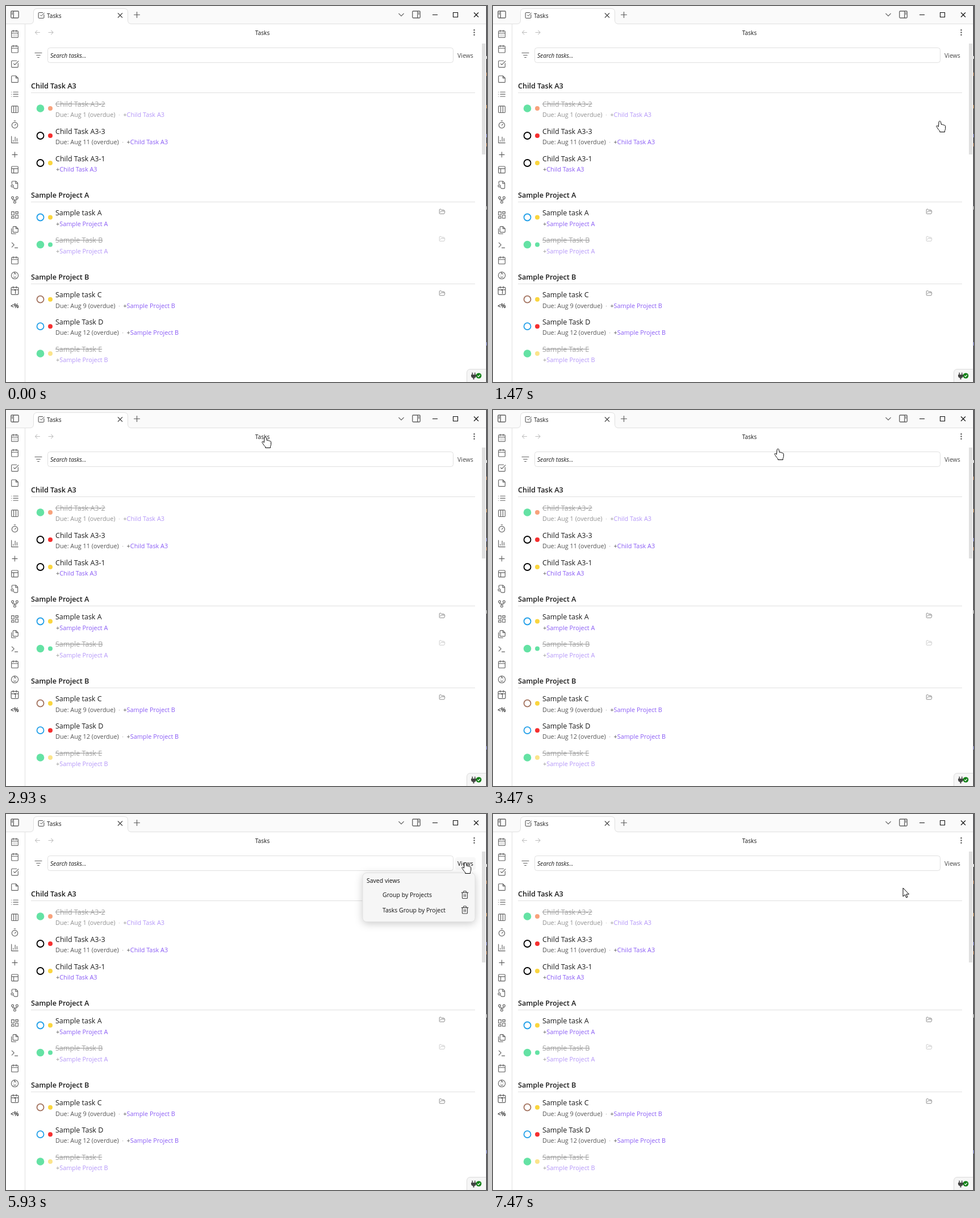
These frames come from a looping animation (847x661 px, 8 s). An HTML page:

```html
<!DOCTYPE html>
<html lang="en">
<head>
<meta charset="utf-8">
<title>Tasks</title>
<style>
html, body { margin: 0; width: 100%; height: 100%; overflow: hidden; background: #fff; }
svg { display: block; font-family: "Open Sans", "Noto Sans", sans-serif; fill: #1a1a1a; }
.icon { fill: none; stroke-width: 1.75; stroke-linecap: round; stroke-linejoin: round; }
.line { fill: none; stroke: #e0e0e0; }
.ui { font-size: 10.2px; }
.heading { font-size: 12.6px; font-weight: 600; }
.title { font-size: 12.5px; }
.meta { font-size: 10.85px; fill: #555; }
.link { fill: #8a5cf5; }
.done { opacity: .64; }
.done .title { fill: #707070; text-decoration: line-through; }
.menu { font-size: 10.5px; fill: #111; }
.pointer { fill: #fff; stroke: #000; stroke-linejoin: round; }
</style>
</head>
<body>
<svg id="stage" width="847" height="661" viewBox="0 0 847 661"></svg>
<script>
// Icon outlines on a 24 unit grid
const calendar = 'M5 4h14a2 2 0 0 1 2 2v14a2 2 0 0 1-2 2H5a2 2 0 0 1-2-2V6a2 2 0 0 1 2-2zM8 2v4M16 2v4M3 10h18';
const square = 'M5 3h14a2 2 0 0 1 2 2v14a2 2 0 0 1-2 2H5a2 2 0 0 1-2-2V5a2 2 0 0 1 2-2z';
const checkbox = 'M21 10v9a2 2 0 0 1-2 2H5a2 2 0 0 1-2-2V5a2 2 0 0 1 2-2h12M9 11l3 3L22 4';
const panel = 'M5 4h14a2 2 0 0 1 2 2v12a2 2 0 0 1-2 2H5a2 2 0 0 1-2-2V6a2 2 0 0 1 2-2z';
const plus = 'M5 12h14M12 5v14';
const cross = 'M6 6l12 12M18 6L6 18';
const arrowLeft = 'M19 12H5M11 6l-6 6 6 6';
const arrowRight = 'M5 12h14M13 6l6 6-6 6';
const folder = 'M6 14l1.5-3A2 2 0 0 1 9.2 10H20a2 2 0 0 1 2 2.5l-1.6 6A2 2 0 0 1 18.5 20H4a2 2 0 0 1-2-2V5a2 2 0 0 1 2-2h4l2.5 3H18a2 2 0 0 1 2 2v2';
const trash = 'M3 6h18M19 6v14a2 2 0 0 1-2 2H7a2 2 0 0 1-2-2V6M8 6V4a2 2 0 0 1 2-2h4a2 2 0 0 1 2 2v2M10 11v6M14 11v6';
const ribbon = [
  calendar + 'M8 14h.01M12 14h.01M16 14h.01M8 18h.01M12 18h.01M16 18h.01',
  calendar,
  checkbox,
  'M15 3H5a2 2 0 0 0-2 2v14a2 2 0 0 0 2 2h14a2 2 0 0 0 2-2V9zM15 3v6h6',
  'M8 6h13M8 12h13M8 18h13M3 6h.01M3 12h.01M3 18h.01',
  square + 'M9 3v18M15 3v18',
  'M10 2h4M12 14l3-3M4 14a8 8 0 1 0 16 0a8 8 0 1 0-16 0',
  'M3 3v18h18M8 17v-3M13 17V5M18 17V9',
  plus,
  square + 'M3 9h18M9 9v12',
  'M4 9V4a2 2 0 0 1 2-2h9l5 5v13a2 2 0 0 1-2 2h-7M14 2v6h6M2 15a3 3 0 1 0 6 0a3 3 0 1 0-6 0M8 18l2 3',
  'M9 18a3 3 0 1 0 6 0a3 3 0 1 0-6 0M3 6a3 3 0 1 0 6 0a3 3 0 1 0-6 0M15 6a3 3 0 1 0 6 0a3 3 0 1 0-6 0M18 9v1a2 2 0 0 1-2 2H8a2 2 0 0 1-2-2V9M12 12v3',
  'M3 3h7v9H3zM14 3h7v5h-7zM14 12h7v9h-7zM3 16h7v5H3z',
  'M15 2H9a2 2 0 0 0-2 2v12a2 2 0 0 0 2 2h10a2 2 0 0 0 2-2V8zM15 2v6h6M3 8v12a2 2 0 0 0 2 2h10',
  'M4 17l6-6-6-6M12 19h8',
  calendar,
  'M2.5 12a9.5 9.5 0 1 0 19 0a9.5 9.5 0 1 0-19 0M8 11h.01M16 11h.01M9 16q3 2 6 0M12 3q-3 3 0 5q3 0 2-2'
];

const icon = (path, x, y, size = 16, color = '#606060') =>
  `<path class="icon" stroke="${color}" d="${path}" transform="translate(${x - size / 2} ${y - size / 2}) scale(${size / 24})"/>`;
const text = (x, y, content, cls, extra = '') => `<text x="${x}" y="${y}" class="${cls}" ${extra}>${content}</text>`;
const rect = (x, y, w, h, fill, extra = '') => `<rect x="${x}" y="${y}" width="${w}" height="${h}" fill="${fill}" ${extra}/>`;
const dot = (x, y, r, fill) => `<circle cx="${x}" cy="${y}" r="${r}" fill="${fill}"/>`;

const green = '#64e2a4', yellow = '#fad53e', red = '#f63030', blue = '#219fe8';
const headings = [[145, 'Child Task A3'], [337, 'Sample Project A'], [480.5, 'Sample Project B']];
// centre y, ring, priority, title, due date, parent; no ring means done
const tasks = [
  [180, '', '#f8a27c', 'Child Task A3-2', 'Aug 1', 0],
  [228, '#000', red, 'Child Task A3-3', 'Aug 11', 0],
  [276, '#000', yellow, 'Child Task A3-1', '', 0],
  [371.5, blue, yellow, 'Sample task A', '', 1],
  [419.5, '', green, 'Sample Task B', '', 1],
  [515.7, '#a1705c', yellow, 'Sample task C', 'Aug 9', 2],
  [563.2, blue, red, 'Sample Task D', 'Aug 12', 2],
  [611, '', '#fbe48b', 'Sample Task E', '', 2]
];

function taskRow([y, ring, priority, title, due, parent]) {
  const dueText = due ? `Due: ${due} (overdue)<tspan dx="5.5" fill="#ababab">·</tspan><tspan dx="5.5">+</tspan>` : '+';
  const circle = ring
    ? `<circle cx="60.5" cy="${y}" r="6" fill="none" stroke="${ring}" stroke-width="1.8"/>`
    : dot(60.5, y, 6.8, green);
  return circle + dot(78, y, 4, priority) +
    `<g class="${ring ? '' : 'done'}">` +
    text(87, y - 3.4, title, 'title') +
    text(due ? 87 : 88, y + 15, `${dueText}<tspan class="link">${headings[parent][1]}</tspan>`, 'meta') + '</g>';
}

const tabOutline = 'M0 31.5H42Q48.5 31.5 48.5 25V11Q48.5 4.5 55 4.5H208Q214.5 4.5 214.5 11V25Q214.5 31.5 221 31.5H846';
const windowBar = () =>
  rect(0, 0, 846, 31, '#fafafa') +
  `<path d="${tabOutline}V34H0z" fill="#fff"/>` +
  `<path class="line" d="${tabOutline}M33.5 32V661"/>` +
  icon(panel + 'M9 4v16M5.5 8h1M5.5 11h1', 15.5, 15, 18) +
  icon(checkbox, 62, 16.5, 13, '#333') + text(72, 20.5, 'Tasks', 'ui') +
  icon(cross, 201, 16.5, 15, '#444') + icon(plus, 230.5, 15.5, 17) +
  icon('M6 9l6 6 6-6', 696, 15.5, 17) + icon(panel + 'M15 4v16M17.5 8h1M17.5 11h1', 722.5, 15, 18) +
  '<path d="M751 15.5h9M787.5 11.5h8v8h-8zM824 11.5l8 8M832 11.5l-8 8" fill="none" stroke="#111" stroke-width="1.1"/>';

const toolbar = () =>
  icon(arrowLeft, 55.5, 46.5, 14, '#bdbdbd') + icon(arrowRight, 79, 46.5, 14, '#bdbdbd') +
  text(451.5, 50.5, 'Tasks', 'ui', 'text-anchor="middle"') +
  [42.3, 46.5, 50.7].map(y => dot(824.5, y, 1.2, '#555')).join('') +
  icon('M3 6h18M7 12h10M10 18h4', 57, 86.5, 16) +
  rect(73.5, 73.5, 714, 26, '#fff', 'rx="4" stroke="#e0e0e0"') +
  text(78, 90.5, 'Search tasks...', 'ui', 'font-style="italic"') +
  rect(791, 76, 36, 22, '#f7f7f7', 'id="pressed" rx="4"') +
  text(795, 90.5, 'Views', 'menu', 'id="views"') +
  rect(838, 66, 6, 195, '#e0e0e0');

const statusBar = () =>
  '<path d="M811.5 662V645Q811.5 638.5 818 638.5H846V662z" fill="#f6f6f6" stroke="#dcdcdc"/>' +
  '<path d="M819 648h9v2q0 3.5-3.5 4v2.5h-2V654q-3.5-.5-3.5-4zM820.5 644.500h1.500v4h-1.500zM825 644.500h1.500v4H825z" fill="#444"/>' +
  dot(832.5, 650, 4.8, '#128017') + '<path d="M830.2 650l1.800 1.800 2.800-3.300" fill="none" stroke="#fff" stroke-width="1.2"/>';

const screenEdge = () => rect(845, 0, 1, 661, '#b8b8b8') + rect(846, 0, 1, 661, '#1f1f23') +
  rect(846, 88, 1, 5, '#fff') +
  [[117, '#a86b3c'], [174, '#c08040'], [225, '#6a70c8'], [241, '#a86b3c'], [352, '#aaa'], [591, '#6a70c8']]
    .map(([y, color]) => rect(846, y, 1, 6, color)).join('');

const savedViews = () =>
  '<g id="menu">' +
  rect(628, 103.5, 198, 86, '#f6f6f6', 'rx="7" stroke="#e0e0e0" style="filter:drop-shadow(0 3px 7px #0003)"') +
  text(635, 121, 'Saved views', 'menu') +
  text(663, 146, 'Group by Projects', 'menu') + icon(trash, 808, 142, 15.5, '#444') +
  text(663, 172.5, 'Tasks Group by Project', 'menu') + icon(trash, 808, 168.5, 15.5, '#444') + '</g>';

const stage = document.getElementById('stage');
stage.innerHTML = rect(0, 0, 847, 661, '#fff') + windowBar() +
  ribbon.map((path, i) => icon(path, 15.5, 49 + i * 26.54, 15.5)).join('') +
  icon(calendar, 15.5, 500.2, 17) + text(13.2, 506, '1', 'ui', 'font-size="8"') +
  text(8, 530.5, '&lt;%', 'ui', 'font-weight="600"') +
  toolbar() +
  headings.map(([y, name]) => text(44, y, name, 'heading') + `<path class="line" d="M44 ${Math.round(y + 8) - .5}H826"/>`).join('') +
  tasks.map(taskRow).join('') +
  icon(folder, 768, 361.5, 11.5, '#777') + icon(folder, 768, 409.5, 11.5, '#c4c4c4') + icon(folder, 768, 505, 11.5, '#777') +
  statusBar() + screenEdge() + savedViews() +
  '<path id="hand" class="pointer" d="M-1.8 1.8a1.6 1.6 0 0 1 3.1-.4L2.5 6.5c1-.6 2.3-.4 2.7.6 1-.5 2.2-.2 2.5.8 1.3-.3 2 .4 2 1.6v4c0 2-1.2 2.8-1.2 4.2V19.5H-.2v-1.6c-1.2-1.6-3-3-4.3-5.6-.9-1.6-2-2.6-1.5-3.4.7-.9 2-.5 3.3 1.3z"/>' +
  '<path id="arrow" class="pointer" d="M0 0V15L3.5 11.8 5.8 17 8 16 5.8 11H10.5z"/>';

// Pointer path: tick, x, y
const TICK = 1000 / 15, LOOP = 8000;
const path = [
  [13, 838, 640], [15, 800, 390], [17, 777, 262], [19, 771, 218], [21, 781, 199], [22, 787, 202], [25, 794, 219],
  [28, 794, 219], [32, 768, 180], [36, 721, 121], [41, 627, 47],
  [43, 540, 42], [46, 290, 58], [48, 182, 72], [50, 300, 70], [52, 502, 68], [54, 590, 80],
  [58, 690, 81], [63, 805, 85], [64, 809, 85],
  [104, 809, 85], [106, 780, 98], [109, 735, 123], [112, 722, 130], [120, 722, 130]
];

function pointerAt(tick) {
  const next = path.findIndex(p => p[0] > tick);
  if (next < 1) return path[next < 0 ? path.length - 1 : 0].slice(1);
  const [a, b] = [path[next - 1], path[next]];
  const k = (tick - a[0]) / (b[0] - a[0]);
  return [a[1] + (b[1] - a[1]) * k, a[2] + (b[2] - a[2]) * k];
}

const part = id => document.getElementById(id);
const show = (id, visible) => part(id).setAttribute('visibility', visible ? 'visible' : 'hidden');
const start = performance.now();

function draw() {
  const time = (performance.now() - start) % LOOP;
  const tick = Math.floor((time + 4) / TICK);
  const [x, y] = pointerAt(tick).map(Math.round);
  const pressed = tick === 68 || tick === 89;
  for (const id of ['hand', 'arrow']) part(id).setAttribute('transform', `translate(${x} ${y})`);
  show('hand', tick >= 13 && tick < 106);
  show('arrow', tick >= 106);
  show('menu', tick >= 69 && tick <= 89);
  show('pressed', pressed);
  part('views').style.fill = pressed ? '#111' : '#444';
  requestAnimationFrame(draw);
}
draw();
</script>
</body>
</html>
```
